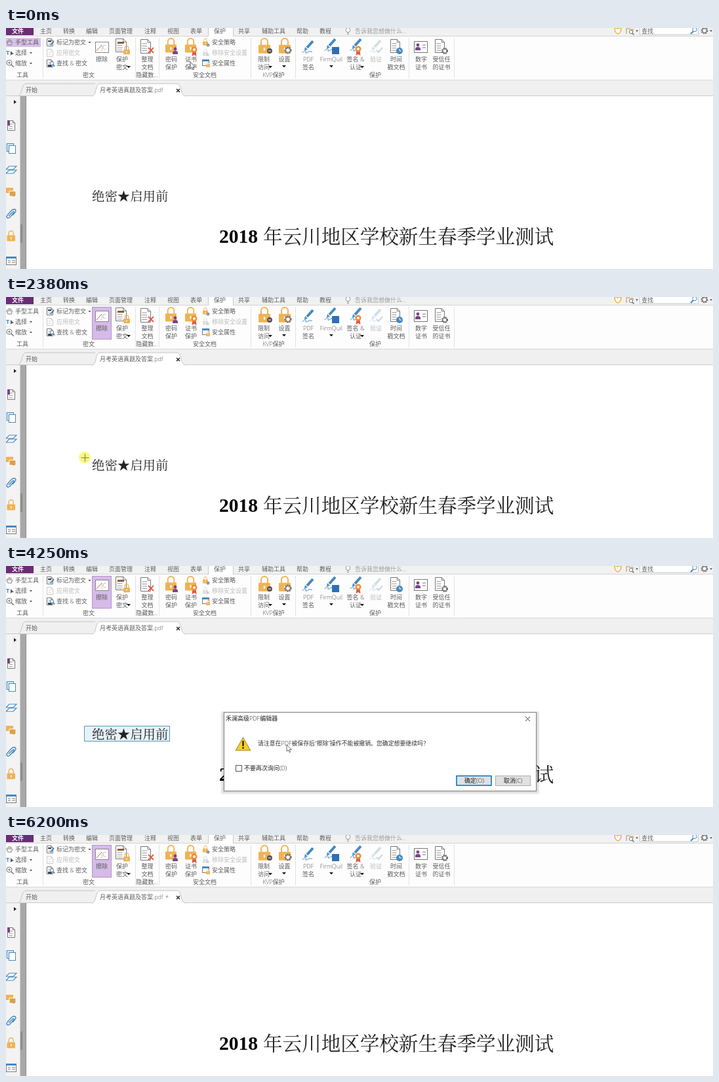
Animation, 1078 px wide and 368 px high, one loop 6.4 s. Source, as an HTML page:

```html
<!DOCTYPE html>
<html lang="zh-CN">
<head>
<meta charset="utf-8">
<style>
html, body { margin: 0; width: 100%; height: 100%; overflow: hidden; background: #fff; }
svg { display: block; width: 1078px; height: 368px; }
text { font: 300 9px "Open Sans", "Noto Sans CJK SC", "Noto Sans CJK", sans-serif; fill: #5c5c5c; white-space: pre; }
text.grey { fill: #bbb; }
text.black { fill: #222; }
text.doc { font: 300 19.4px "Noto Serif CJK SC", "Noto Sans CJK SC", "Noto Sans CJK", serif; fill: #222; }
text.big { font-size: 29.55px; }
text.year { font: bold 29.5px "Liberation Serif", serif; fill: #000; }
#ring { mix-blend-mode: multiply; }
</style>
</head>
<body>
<svg id="stage" viewBox="0 0 1078 368"></svg>
<script>
const BLUE = '#4488c0', GOLD = '#f0b254', PURPLE = '#7a4387', RED = '#dc5a48', INK = '#777';

// Drawing helpers: text is placed by its vertical middle
const text = (x, y, s, cls = '', more = '') =>
  `<text x="${x}" y="${y + 3.3}" class="${cls}" ${more}>${s}</text>`;
const mid = (x, y, s, cls) => text(x, y, s, cls, 'text-anchor="middle"');
const rect = (x, y, w, h, fill, stroke = 'none', more = '') =>
  `<rect x="${x}" y="${y}" width="${w}" height="${h}" fill="${fill}" stroke="${stroke}" ${more}/>`;
const path = (d, stroke, w = 1, fill = 'none') =>
  `<path d="${d}" stroke="${stroke}" stroke-width="${w}" fill="${fill}"/>`;
const disc = (x, y, r, fill, stroke = 'none') =>
  `<circle cx="${x}" cy="${y}" r="${r}" fill="${fill}" stroke="${stroke}"/>`;
const caret = (x, y, r = 2, c = '#444') => path(`M${x - r} ${y - r / 2}h${2 * r}l${-r} ${r * 1.1}z`, 'none', 0, c);
const cross = (x, y, r, c, w = 1) => path(`M${x - r} ${y - r}l${2 * r} ${2 * r}m0 ${-2 * r}l${-2 * r} ${2 * r}`, c, w);

// Icons
const page = (x, y, w, h, c = INK) => {
  const f = w * .3;
  let s = path(`M${x} ${y}h${w - f}l${f} ${f}v${h - f}h${-w}zM${x + w - f} ${y}v${f}h${f}`, c, 1, '#fff');
  for (let k = y + f + 2; k < y + h - 1.5; k += 3.5) s += path(`M${x + 2} ${k}h${w * .5}`, c, .8);
  return s;
};
const lock = (x, y, w, c = GOLD) => {
  const r = w * .28;
  return path(`M${x + w / 2 - r} ${y + w * .62}v${-r}a${r} ${r} 0 0 1 ${2 * r} 0v${r}`, c, w * .11) +
    rect(x, y + w * .6, w, w * .72, c, 'none', 'rx="1"') +
    path(`M${x + w / 2} ${y + w * .84}v${w * .24}`, '#fff', w * .13);
};
const pen = (x, y, c = BLUE) =>
  path(`M${x + 7} ${y + 12}l9 -10`, c, 4) + path(`M${x + 3} ${y + 16}l1 -5l4 4z`, 'none', 0, c) +
  path(`M${x} ${y + 20}c4 -5 6 -4 5 -1s3 0 5 -1s2 1 5 0`, c, 1);
const ribbon = (x, y) =>
  path(`M${x - 2.5} ${y + 2}l-1 8l3.5 -2l3.5 2l-1 -8z`, 'none', 0, RED) +
  disc(x, y, 4.5, '#f08c35') + disc(x, y, 2, '#fff');
const gear = (x, y, r, c = '#666') =>
  `<circle cx="${x}" cy="${y}" r="${r}" fill="none" stroke="${c}" stroke-width="2" stroke-dasharray="2 1.2"/>` +
  disc(x, y, r * .75, '#fff', c);
const lens = (x, y, r, c) => disc(x, y, r, '#fff', c) + path(`M${x + r * .7} ${y + r * .7}l${r} ${r}`, c, 1.6);
const person = (x, y, c) => disc(x, y, 2.4, c) + path(`M${x - 4} ${y + 8}v-2q0 -3 4 -3t4 3v2z`, 'none', 0, c);
const clock = (x, y) => disc(x, y, 5, BLUE) + path(`M${x} ${y - 3}v3h3`, '#fff');

function menuBar() {
  let s = rect(0, 0, 1078, 12, '#f1f1f1') + path('M0 12.5H1078', '#d4d4d4') +
    rect(0, -1, 42, 12, '#6b2c76') + text(9, 4.5, '文件', '', 'style="fill:#fff;font-weight:bold"') +
    rect(308.5, -2, 38, 15, '#fff', '#c8c8c8') + rect(309, 11, 37, 3, '#fff');
  const tabs = [[52, '主页'], [87, '转换'], [122, '编辑'], [157, '页面管理'], [211, '注释'], [246, '视图'],
    [281, '表单'], [317, '保护'], [354, '共享'], [390, '辅助工具'], [443, '帮助'], [478, '教程']];
  for (const [x, name] of tabs) s += text(x, 4.5, name);
  s += disc(521.5, 3, 3.4, '#fff', '#999') + path('M520 7.5h3M520 9.5h3', '#999') +
    text(532, 4.5, '告诉我您想做什么...', '', 'style="fill:#999"') +
    path('M928 1q0 6 5 8q5 -2 5 -8q-3 -2 -5 0q-2 -2 -5 0z', GOLD, 1.6, '#fff') +
    path('M946 9V1h4l1 1h5v3', '#c99a55', 1.2) + lens(953, 6, 2.6, INK) + caret(962, 4.5) +
    rect(966.5, -2, 89, 12, '#fff', '#c8c8c8') + text(969, 4.5, '查找') +
    path('M1044 9l4 -4', BLUE, 2) + disc(1050, 2.5, 3.2, '#fff', BLUE) +
    gear(1065, 4, 4.3) + caret(1075, 4.5);
  return s;
}

function ribbonBar() {
  let s = rect(0, 13, 1078, 67, '#fdfdfd') + path('M0 79.5H1078', '#d8d8d8');
  for (const x of [56, 197, 233, 373, 441, 614, 683]) s += path(`M${x + .5} 15V77`, '#e2e2e2');
  for (const [x, name] of [[25, '工具'], [126, '密文'], [215, '隐藏数...'], [303, '安全文档'], [408, 'KVP保护'], [563, '保护']])
    s += mid(x, 71.5, name);

  s += rect(0, 15, 53, 14, '#d9c2e8', 'none', 'id="hand"') + rect(131.5, 15.5, 29, 49, '#e8d8f5', 'none', 'id="erase"');
  s += path('M2 22v-3m2 3v-5m2 5v-5m2 5v-4M1 21l2 5h5l2 -5', '#888', 1.1) + text(14, 22, '手型工具');
  s += text(0, 38, 'T', '', `style="font-weight:bold;fill:${BLUE}"`) + path('M7 35v7l2 -2h3z', 'none', 0, '#555') +
    text(14, 38, '选择') + caret(38, 38);
  s += lens(5, 53, 4, INK) + path('M3 53h4M5 51v4', INK) + text(14, 54, '缩放') + caret(38, 54);

  const small = (x, y, name, cls, c) => page(x + .5, y - 5.5, 9, 11, c) + text(x + 15, y, name, cls);
  s += small(62, 22, '标记为密文') + path('M68 26l5 -6', BLUE, 2) + rect(64, 19, 5, 2, '#444') + caret(127.5, 22);
  s += small(62, 38, '应用密文', 'grey', '#ccc');
  s += small(62, 54, '查找 &amp; 密文') + rect(64, 56, 6, 3, '#444') + lens(70, 54, 2.6, BLUE);

  const big = (x, a, b, cls) => mid(x, 48, a, cls) + (b ? mid(x, 59.5, b, cls) : '');
  s += rect(136.5, 21.5, 20, 16, '#fff', '#888') + path('M138 35l8 -9', RED, 1) +
    text(145, 29.5, 'JC', '', 'style="fill:#888"') + big(146, '擦除');
  s += page(167.5, 16.5, 16, 20) + rect(170, 21, 10, 3, '#8a5a3a') + lock(179, 27, 10) + big(177, '保护', '密文') + caret(187, 59.5, 3, '#111');
  s += page(205.5, 17.5, 15, 21) + cross(221, 34, 4, RED, 1.8) + big(215.5, '整理', '文档');
  s += lock(243, 15, 17) + person(258, 32, PURPLE) + big(252, '密码', '保护');
  s += lock(273, 15, 17) + ribbon(287, 33) + big(282, '证书', '保护');
  s += lock(300, 16, 8) + disc(308, 26, 2.5, '#999') + text(314, 22, '安全策略');
  s += lock(300, 32, 8, '#ddd') + cross(308, 41, 2, '#c4c4c4') + text(314, 38, '移除安全设置', 'grey');
  s += rect(299.5, 48.5, 10, 9, '#fff', INK) + rect(299, 48, 11, 3, BLUE) + lock(305, 52, 6) + text(314, 54, '安全属性');

  s += lock(385, 15, 18) + disc(402, 35, 4, '#555') + path('M400 35h4', '#fff') + big(393, '限制', '访问') + caret(403, 59.5, 3, '#111');
  s += lock(416, 15, 18) + gear(430, 34, 4.5) + big(424.5, '设置') + caret(424, 58.5, 3, '#111');
  s += pen(452, 18) + big(461, 'PDF', '签名');
  s += pen(486, 15) + rect(497, 29, 11, 11, '#2f6fb4') + big(496, 'FirmQuil') + caret(496, 58.5, 3, '#111');
  s += pen(525, 15) + ribbon(537, 32) + big(533, '签名 &amp;', '认证') + caret(543, 59.5, 3, '#111');
  s += pen(555, 17, '#d3dee7') + path('M565 34l3 3l6 -7', '#c8d8e4', 2) + big(564, '验证', '', 'grey');
  s += page(586.5, 17.5, 14, 20) + clock(600, 35) + big(595, '时间', '戳文档');
  s += rect(622.5, 20.5, 20, 17, '#fff', INK) + person(628, 26, PURPLE) + path('M635 26h5M635 30h5', INK) + big(633, '数字', '证书');
  s += page(654.5, 17.5, 14, 20) + gear(669, 35, 4) + big(664, '受信任', '的证书');
  return s;
}

function docTabs() {
  return rect(0, 80, 1078, 24, '#f0f0f0') + path('M0 103.5H1078', '#ccc') +
    path('M18 103.5q4 0 6 -9q2 -9.5 6 -9.5H136', '#c4c4c4', 1, '#f0f0f0') +
    path('M131 104q4 0 6 -9q2 -10 6 -10H261q4 0 6 9q2 10 7 10', '#c4c4c4', 1, '#fff') +
    text(30, 95, '开始') + text(143, 95, '月考英语真题及答案.pdf') +
    `<g id="star">${text(243, 95.5, '*')}</g>` + cross(262.5, 95.5, 2.5, '#222', 1.4);
}

function sideBar() {
  return rect(0, 104, 22, 264, '#f3f3f3') + rect(22, 104, 9, 264, '#a8a8a8') + rect(21, 104, 1, 264, '#d0d0d0') +
    rect(30, 104, 1, 264, '#8c8c8c') + rect(22, 300, 3, 28, '#8b8b8b') +
    path('M12 110v6l4 -3z', 'none', 0, '#222') +
    page(2.5, 141.5, 11, 15) + rect(2, 141, 4, 8, PURPLE) +
    rect(1.5, 176.5, 10, 12, '#dcebf6', BLUE) + rect(4.5, 179.5, 10, 12, '#fff', BLUE) +
    path('M0 222l5 -5h11l-5 5zM0 216l5 -5h11l-5 5z', BLUE, 1.2, '#fff') +
    rect(0, 244, 11, 8, GOLD) + path('M5 249h10v8h-2v2l-3 -2h-5z', '#fff', 1, '#dba04e') +
    path('M4 287l6 -6q3 -2 2 1l-6 7q-4 3 -5 -1q0 -2 8 -10q5 -3 6 1q0 2 -5 7', BLUE, 1.4) +
    lock(1.5, 309, 12.5) +
    rect(.5, 349.5, 15, 12, '#fff', INK) + rect(0, 349, 16, 3, BLUE) + path('M3 355h4M3 358h4M9 355h5M9 358h5', INK);
}

const documentText = () =>
  rect(119.5, 244.5, 0, 0, '#e6f2f8', '#5a98b8', 'id="pick"') +
  `<g id="secret">${text(131, 261, '绝密★启用前', 'doc')}</g>` + text(325, 324.5, '2018', 'year') +
  text(392, 326, '年云川地区学校新生春季学业测试', 'doc big');

const tooltip = () => '<g id="tip">' + rect(162, 40, 93, 38, '#000', 'none', 'opacity=".25"') +
  rect(160.5, 38.5, 92, 38, '#fff', '#767676') +
  text(166, 48, '擦除', 'black', 'style="font-weight:bold"') + text(166, 65, '擦除文档的选定区域', '', 'style="fill:#777"') + '</g>';

function dialog() {
  let s = '<g id="dialog">';
  for (let k = 1; k < 6; k++)
    s += rect(332 - k, 224 - k / 2, 477 + 2 * k, 120 + 1.5 * k, '#000', 'none', 'opacity=".035" rx="2"');
  return s + rect(332.5, 223.5, 476, 120, '#fff', '#858585') +
    text(335, 233, '禾澜高级PDF编辑器', 'black') + cross(795.5, 233.5, 3.5, '#444') +
    path('M361.5 262l11 19.5h-22z', '#b8a04a', 1.5, '#ffcf24') + path('M361.5 267v8m0 1.5v2.5', '#111', 2.2) +
    text(384, 271, '请注意在PDF被保存后“擦除”操作不能被撤销。您确定想要继续吗？', '', 'style="font-size:8.9px;fill:#333"') +
    rect(350.5, 304.5, 9, 9, '#fff', '#555', 'id="box"') + text(363, 309, '不要再次询问(D)', 'black') +
    rect(687, 320.5, 53, 14.5, '#e1e1e1', '#0078d7', 'id="ok" stroke-width="1.6"') + mid(714, 328, '确定(O)', 'black') +
    rect(746.5, 320.5, 53, 15, '#e1e1e1', '#adadad') + mid(773, 328, '取消(C)', 'black') + '</g>';
}

const pointers = () => disc(0, 0, 9, '#fcf880').replace('<circle', '<circle id="ring"') +
  `<g id="arrow">${path('M0 0v10l2.4 -2l1.8 3.6l1.6 -.8l-1.7 -3.4h3.2z', '#444', .8, '#fff')}</g>` +
  `<g id="plus">${path('M-5.5 .5h12M.5 -5.5v12', '#777')}</g>`;

document.getElementById('stage').innerHTML = rect(0, 0, 1078, 368, '#fff') + menuBar() + ribbonBar() +
  docTabs() + sideBar() + documentText() + dialog() + tooltip() + pointers();

const el = id => document.getElementById(id);
const set = (id, name, value) => el(id).setAttribute(name, value);
const show = (id, on) => set(id, 'visibility', on ? 'visible' : 'hidden');
const within = (t, a, b) => t >= a && t < b;
const clamp = v => Math.max(0, Math.min(1, v));

// Pointer stops: time, x, y
const stops = [[70, 281, 52], [680, 155, 30], [860, 155, 30], [1370, 138, 239], [1780, 120, 245], [2380, 120, 245],
  [3360, 250, 268], [3430, 248, 267], [3780, 248, 267], [4250, 428, 273], [4450, 427, 305], [4930, 699, 323],
  [5470, 699, 323], [5480, 704, 328], [6120, 704, 328], [6130, 715, 332]];

function pointerAt(t) {
  const i = stops.findIndex(s => s[0] > t);
  if (i === 0) return stops[0].slice(1);
  if (i < 0) return stops[stops.length - 1].slice(1);
  const [t0, x0, y0] = stops[i - 1], [t1, x1, y1] = stops[i];
  const u = Math.sin((t - t0) / (t1 - t0) * Math.PI / 2);
  return [x0 + (x1 - x0) * u, y0 + (y1 - y0) * u];
}

function draw(t) {
  const [x, y] = pointerAt(t);
  const erased = t >= 5475;
  const plus = (t < 3360 && y > 103) || erased;
  for (const id of ['ring', 'arrow', 'plus']) set(id, 'transform', `translate(${Math.round(x)} ${Math.round(y)})`);
  show('ring', within(t, 755, 900) || within(t, 2375, 3370) || within(t, 4995, 5330));
  show('arrow', !plus);
  show('plus', plus && t < 6195);

  const pressed = t >= 890;
  show('hand', !pressed);
  show('erase', t >= 550);
  set('erase', 'fill', pressed ? '#d6bbe8' : '#e8d8f5');
  set('erase', 'stroke', pressed ? '#b493cc' : 'none');
  show('tip', within(t, 680, 900));

  show('pick', within(t, 2440, 5475));
  const [px, py] = t < 3360 ? [x, y] : [250, 268];
  set('pick', 'width', Math.max(0, Math.round(px) - 120));
  set('pick', 'height', Math.max(0, Math.round(py) - 245));

  const a = t < 5000 ? clamp((t - 3560) / 350) : clamp((5445 - t) / 175);
  const k = .958 + .042 * a;
  set('dialog', 'opacity', a);
  set('dialog', 'transform', `translate(570.5 283.5) scale(${k}) translate(-570.5 -283.5)`);
  set('box', 'stroke', t > 4300 && y > 300 && x < 431 ? '#0078d7' : '#555');
  set('ok', 'fill', x > 687 && y > 320 ? '#e5f1fb' : '#e1e1e1');
  show('secret', !erased);
  show('star', erased);
}

const start = performance.now();
(function frame() {
  draw((performance.now() - start) % 6400);
  requestAnimationFrame(frame);
})();
</script>
</body>
</html>
```
